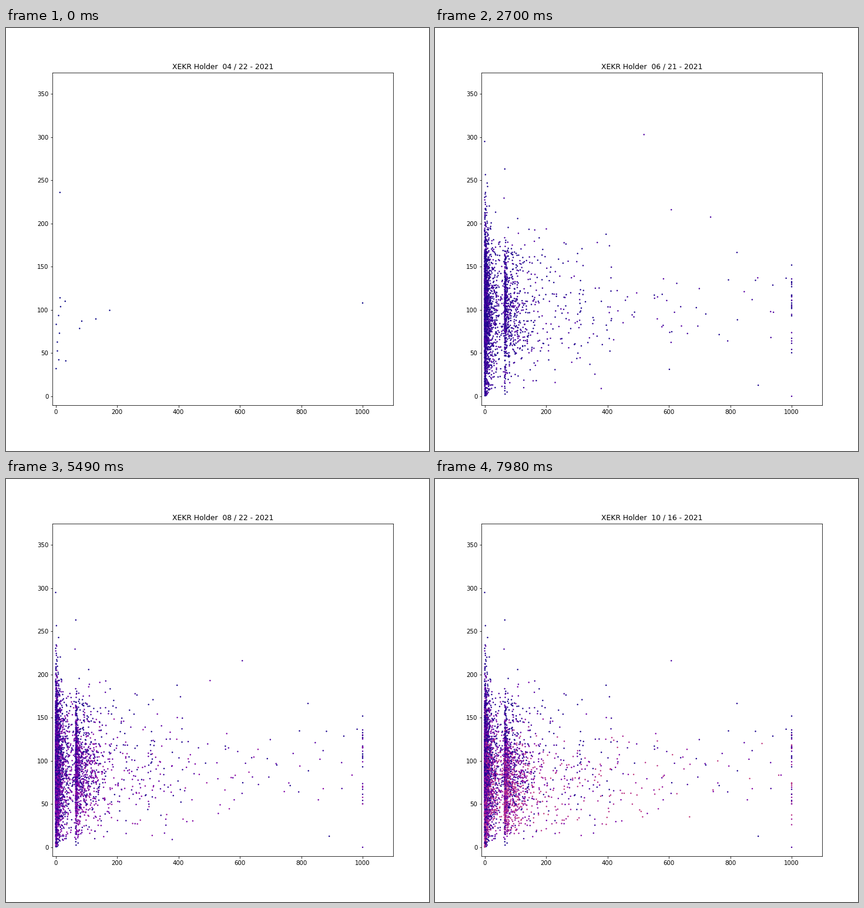
A matplotlib script that plays this animation: 720 by 720 pixels, repeating every 8 s.

```python
import numpy as np
import matplotlib.pyplot as plt
from matplotlib.animation import FuncAnimation

SIZE, DPI = 720, 72
DAYS, LOOP_MS = 178, 8000
FIRST_DAY = np.datetime64("2021-04-22")
NAME = "XEKR Holder"
FOREVER = 999
SHADE_PER_DAY = 0.0027

rng = np.random.default_rng(22)
plt.rcParams["font.size"] = 10.3

# A few holders far from the crowd: x, y, first day, last day
LANDMARKS = [
    (1000, 108, 0, 130), (0, 295, 10, FOREVER), (822, 166.5, 12, FOREVER),
    (982, 136.7, 14, FOREVER), (608, 216, 45, FOREVER), (519, 303, 50, 75),
    (736, 207.5, 45, 110), (503, 193, 80, 130), (1000, 0, 50, FOREVER),
]


def opening():
    """Holders of the first day: some set apart, the rest close to x = 0."""
    apart = [(14, 236), (31, 110), (33, 41), (78, 78.5),
             (85, 87), (131, 89.5), (176, 99.5)]
    close = np.column_stack([rng.uniform(0, 18, 9), np.linspace(32, 114, 9)])
    return [(x, y, 0, 20) for x, y in [*apart, *close]]


def joins(day):
    """New holders on a day: a trickle, a burst, then a slowing flow."""
    if day == 0:
        return 0
    if day < 8:
        return 3
    return int(58 - 28 * day / DAYS + 950 * np.exp(-abs(day - 9) / 0.9))


def mix(n, share, near, wide):
    """Exponential distances, a share of them tight, the rest loose."""
    return rng.exponential(np.where(rng.random(n) < share, near, wide))


def crowd():
    born = np.repeat(np.arange(DAYS), [joins(d) for d in range(DAYS)])
    n = len(born)
    age = born / DAYS

    pick = rng.random(n)
    at_zero = pick < 0.68 - 0.32 * age
    groups = [pick > 0.993, pick > 0.973, at_zero, pick < 0.82 - 0.12 * age]
    x = np.select(groups, [
        np.full(n, 1000.0),
        300 + 680 * rng.random(n) ** 1.5,
        mix(n, 0.55, 2.5, 12),
        65 + mix(n, 0.45, 2.5, 28),
    ], rng.exponential(115, n))

    mean = 106 - 42 * age
    spread = np.where(at_zero, 49, 41) - 14 * age
    floor = np.minimum(x, 20) * age
    y = floor + np.abs(rng.normal(mean, spread) - floor)

    stay = np.where(rng.random(n) < 0.45, FOREVER, rng.exponential(40, n))
    inside = (x <= 1000) & (y < 265)
    return np.column_stack([x, y, born, born + stay + 1])[inside]


holders = np.vstack([crowd(), opening(), LANDMARKS])
holders = rng.permutation(holders)
spots, born, gone = holders[:, :2], holders[:, 2], holders[:, 3]
shades = plt.get_cmap("plasma")(born * SHADE_PER_DAY)

fig = plt.figure(figsize=(SIZE / DPI, SIZE / DPI), dpi=DPI)
left, right, top, bottom = 79.3, 659.3, 75.55, 641.55
ax = fig.add_axes([left / SIZE, 1 - bottom / SIZE,
                   (right - left) / SIZE, (bottom - top) / SIZE])
ax.set_xlim(-10, 1100)
ax.set_ylim(-10, 375)
ax.set_xticks(range(0, 1001, 200))
ax.set_yticks(range(0, 351, 50))
title = ax.set_title("")
dots = ax.scatter([], [], s=6.25, linewidths=0)


def draw(day):
    alive = (born <= day) & (day < gone)
    dots.set_offsets(spots[alive])
    dots.set_facecolor(shades[alive])
    year, month, date = str(FIRST_DAY + day).split("-")
    title.set_text(f"{NAME}  {month} / {date} - {year}")
    return dots, title


anim = FuncAnimation(fig, draw, frames=DAYS, interval=LOOP_MS / DAYS,
                     repeat=True, repeat_delay=0, blit=False)
plt.show()
```
